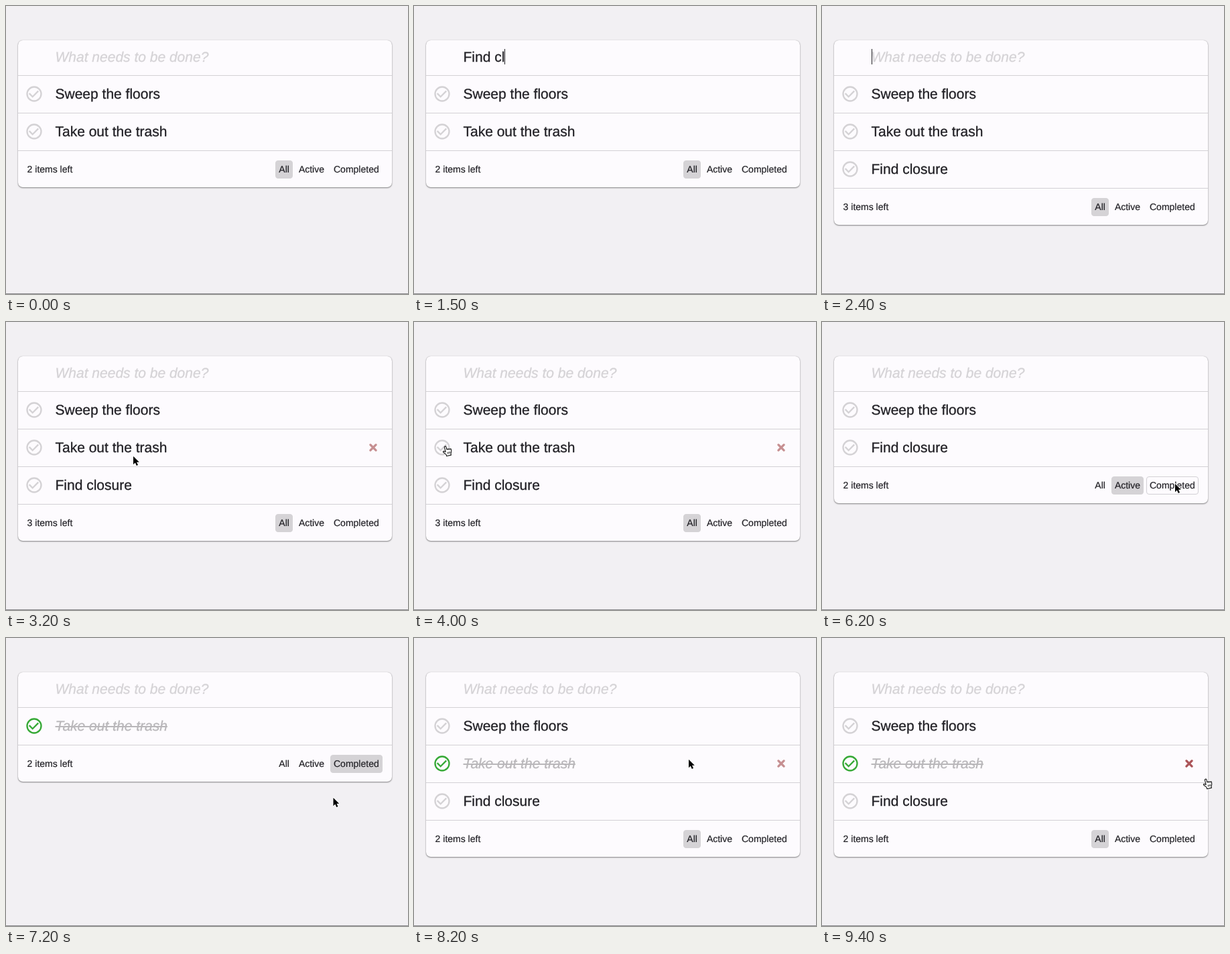
Recreate the animation shown at these times as an HTML page. Size 600 px wide and 429 px high, loop 9.5 s.

```html
<!DOCTYPE html>
<html lang="en">
<head>
<meta charset="utf-8">
<title>Todo list</title>
<style>
  html, body { margin: 0; width: 100%; height: 100%; overflow: hidden; }
  body {
    position: relative; background: #f2f0f3; color: #222126;
    font: 14px "Liberation Sans", Arial, sans-serif;
    text-rendering: geometricPrecision; -webkit-text-stroke: .2px;
  }
  .edge { position: absolute; left: 0; top: 428px; width: 600px; height: 1px; background: #8b8a8d; }
  .card {
    position: absolute; left: 18px; top: 51px; width: 558px;
    border-radius: 7px; background: #fdfbfe;
    box-shadow: 0 1px 2px rgba(0, 0, 0, .45), 0 0 1px rgba(0, 0, 0, .3);
  }
  .entry, .title { font-size: 21px; white-space: pre; -webkit-text-stroke: .3px; }
  .entry { position: relative; height: 52px; line-height: 52px; padding-left: 55.5px; }
  .hint { position: absolute; left: 55.5px; top: 0; color: #d5d3d6; font-style: italic; }
  .caret { display: inline-block; width: 1px; height: 23px; margin-right: -2px; background: #222126; vertical-align: -4px; }
  .row, .foot { position: relative; box-sizing: border-box; border-top: 1px solid #d3d1d5; }
  .row { height: 56px; line-height: 55px; }
  .foot { height: 55px; line-height: 54px; }
  .title { position: absolute; left: 55.5px; }
  .check { position: absolute; left: 10.4px; top: 13.4px; color: #d4d2d5; }
  .cross { position: absolute; left: 523px; top: 20px; color: #c68f91; visibility: hidden; }
  .hover .cross { visibility: visible; }
  .hot .cross { color: #ab5458; }
  .done .title { color: #b9b7ba; font-style: italic; text-decoration: line-through; }
  .done .check { color: #36a936; }
  .count { position: absolute; left: 13.6px; }
  .tabs { position: absolute; right: 14.3px; top: 14px; display: flex; gap: 4px; line-height: 24.5px; }
  .tab { border: 1px solid transparent; border-radius: 4px; padding: 0 4px; }
  .tab.hover { border-color: #d3d1d5; }
  .tab.on { background: #d5d3d6; border-color: #d5d3d6; }
  svg { display: block; fill: none; stroke: currentColor; }
  #pointer { position: absolute; left: 0; top: 0; width: 600px; height: 429px; }
</style>
</head>
<body>
<div class="edge"></div>
<div class="card">
  <div class="entry"><span class="hint">What needs to be done?</span><span class="typed"></span><span class="caret"></span></div>
  <div class="list"></div>
  <div class="foot">
    <span class="count"></span>
    <div class="tabs"><span class="tab">All</span><span class="tab">Active</span><span class="tab">Completed</span></div>
  </div>
</div>
<svg id="pointer" viewBox="0 0 600 429">
  <g data-kind="arrow" fill="#000" stroke="#fff" stroke-width="1.8" paint-order="stroke" stroke-linejoin="round">
    <path d="M0 0V12.2L2.8 9.6L4.8 14L7 13L5 8.8H8.8Z"/>
  </g>
  <g data-kind="hand" stroke="#111" stroke-width="1.1" stroke-linejoin="round">
    <g transform="rotate(-14)">
      <path fill="#fff" d="M-1 8.5L-3 7C-4 6.3-5 7.5-4.2 8.5L-1 12.5V15H6V13C7.5 11.5 8 9.5 8 7C8 5.5 6.2 5.5 6 6.5C6 5.1 4 4.9 3.8 6.1C3.6 4.7 1.8 4.7 1.6 5.5V1.5C1.4-.2-1-.2-1 1.5Z"/>
      <path stroke-width=".8" d="M1.8 9.5V12.3M3.6 9.5V12.3M5.4 9.5V12.3"/>
    </g>
  </g>
  <g data-kind="beam" stroke="#222" stroke-width="1">
    <path d="M-3-8Q0-8 0-6V6Q0 8-3 8M3-8Q0-8 0-6V6Q0 8 3 8M-2 3H2"/>
  </g>
</svg>
<script>
const LOOP = 9500, STEP = 100;
const FOCUS = 200, TYPE = 900, ENTER = 2400, WAKE = 2700, BLUR = 4000;
const CHECK = 4200, ACTIVE = 5200, COMPLETED = 6500, ALL = 7900;
const $ = s => document.querySelector(s), $$ = s => [...document.querySelectorAll(s)];

$('.list').innerHTML = ['Sweep the floors', 'Take out the trash', 'Find closure'].map(name => `
  <div class="row">
    <svg class="check" width="28" height="28" viewBox="0 0 24 24" stroke-width="2">
      <circle cx="12" cy="12" r="9"/><path d="M5.7 11.3L10 15.6L17.3 8.3"/>
    </svg>
    <span class="title">${name}</span>
    <svg class="cross" width="14" height="14" viewBox="0 0 14 14" stroke-width="3.3" stroke-linecap="round">
      <path d="M2.9 2.9L11.1 11.1M11.1 2.9L2.9 11.1"/>
    </svg>
  </div>`).join('');

const rows = $$('.row'), tabs = $$('.tab'), shapes = $$('[data-kind]');

// One entry per step while typing; an empty one is a pause
const keys = ['F', 'i', 'n', 'd', '', ' c', 'l', '', 'o', 's', 'ur', 'e'];

// Pointer moves, each from where the last one ended
const origin = [239, 284];
const moves = [
  { from: 200, to: 300, x: 244, y: 66 },
  { from: 2600, to: 3200, x: 190, y: 200 },
  { from: 3300, to: 4000, x: 46, y: 185, sag: 35 },
  { from: 4400, to: 4600, x: 330, y: 308 },
  { from: 4700, to: 5000, x: 451, y: 302 },
  { from: 5600, to: 6200, x: 527, y: 241 },
  { from: 6800, to: 7200, x: 488.5, y: 238 },
  { from: 7200, to: 7800, x: 410, y: 181 },
  { from: 8900, to: 9400, x: 572, y: 210 }
];

const within = (t, a, b) => t >= a && t < b;
const easeOut = k => 1 - (1 - k) ** 2;

function locate(t) {
  if (t < FOCUS || within(t, TYPE, WAKE)) return null;
  let [x, y] = origin;
  for (const m of moves) {
    if (t < m.from) break;
    const k = easeOut(Math.min(1, (t - m.from) / (m.to - m.from)));
    x += (m.x - x) * k;
    y += (m.y - y) * k + (m.sag || 0) * Math.sin(Math.PI * k);
  }
  return [x, y];
}

// Solid while typing, otherwise half a second on and half off
function caretOn(t) {
  const since = t < TYPE ? FOCUS : t < ENTER ? t : ENTER;
  return within(t, FOCUS, BLUR) && (t - since) % 1000 < 500 && !within(t, 700, TYPE);
}

function render(t) {
  const text = within(t, TYPE, ENTER) ? keys.slice(0, (t - TYPE) / STEP + 1).join('') : '';
  $('.typed').textContent = text;
  $('.hint').hidden = text !== '';
  $('.caret').style.visibility = caretOn(t) ? 'visible' : 'hidden';

  const added = t >= ENTER, done = t >= CHECK;
  const filter = within(t, ACTIVE, COMPLETED) ? 1 : within(t, COMPLETED, ALL) ? 2 : 0;
  const at = locate(t), [x, y] = at || [-99, -99];
  let kind = y < 103 ? 'beam' : 'arrow', top = 103;

  rows.forEach((row, i) => {
    const checked = done && i === 1;
    const shown = (i < 2 || added) && (filter === 0 || checked === (filter === 2));
    const hover = shown && within(x, 18, 577) && within(y, top, top + 56);
    const hot = hover && x > 528;
    row.style.display = shown ? '' : 'none';
    row.classList.toggle('done', checked);
    row.classList.toggle('hover', hover);
    row.classList.toggle('hot', hot);
    if (hot || hover && x < 56) kind = 'hand';
    if (shown) top += 56;
  });

  $('.count').textContent = `${2 + added - done} items left`;
  tabs.forEach((tab, i) => {
    const box = tab.getBoundingClientRect();
    tab.classList.toggle('on', i === filter);
    tab.classList.toggle('hover', within(x, box.left, box.right) && within(y, box.top, box.bottom));
  });

  shapes.forEach(g => {
    g.style.display = at && g.dataset.kind === kind ? '' : 'none';
    g.setAttribute('transform', `translate(${x} ${y})`);
  });
}

const start = performance.now();
function tick() {
  const t = (performance.now() - start) % LOOP;
  render(Math.floor(t / STEP) * STEP);
  requestAnimationFrame(tick);
}
tick();
</script>
</body>
</html>
```
